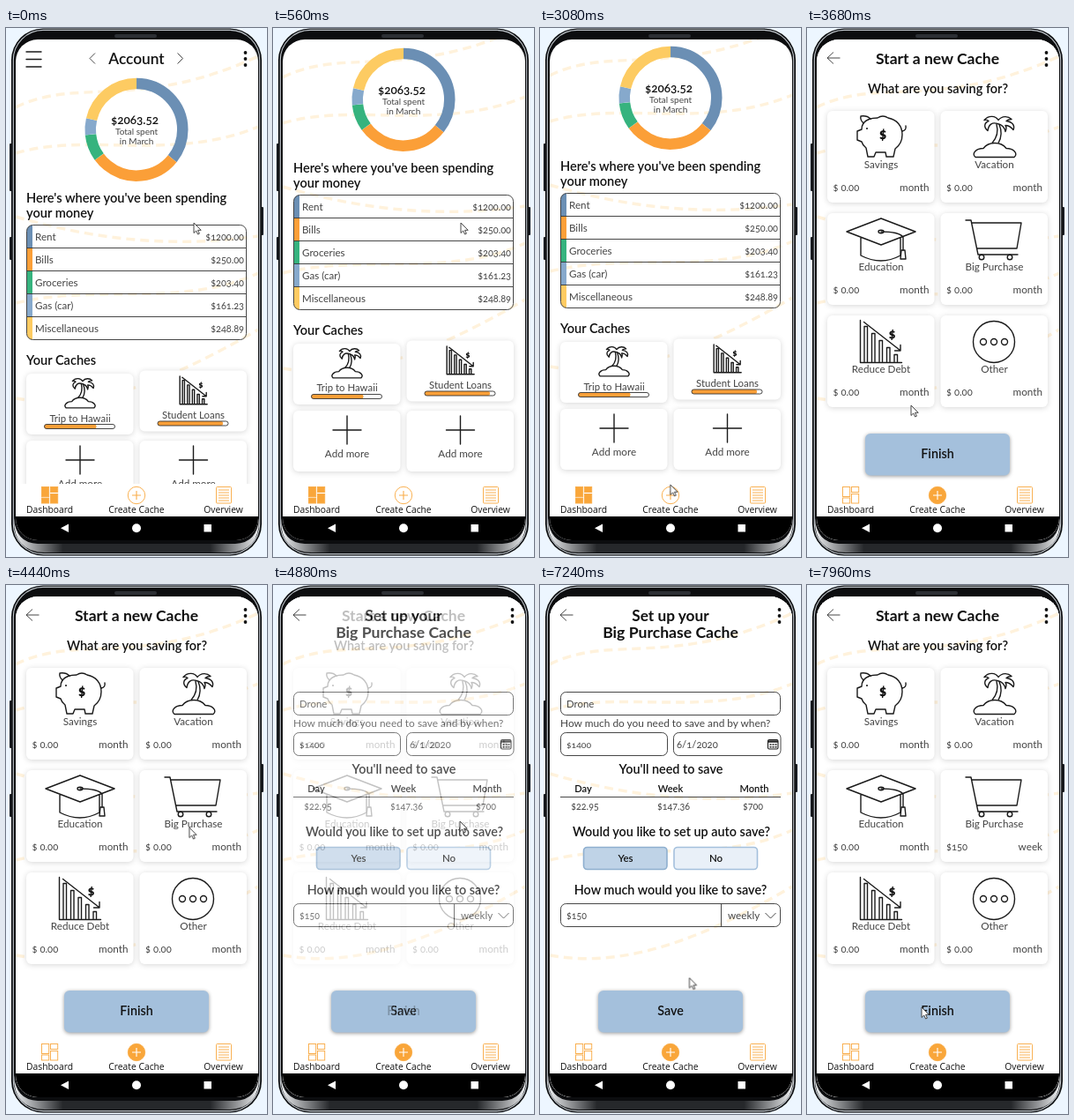
Write an HTML page that moves like this. It is 296 px wide and 600 px high and loops after 8000 ms.

```html
<!DOCTYPE html>
<html lang="en">
<head>
<meta charset="utf-8">
<title>Savings app walkthrough</title>
<style>
html, body { margin: 0; width: 100%; height: 100%; overflow: hidden; background: #edf6ff; }
svg { display: block; width: 296px; height: 600px; }
text { font-family: Lato, "Open Sans", sans-serif; font-variant-numeric: oldstyle-nums; fill: #444; }
.b { font-weight: 600; fill: #111; }
.title { font-weight: 700; fill: #111; }
.heavy { font-weight: 900; fill: #111; }
.nav text { font-family: "Open Sans", "Noto Sans", sans-serif; fill: #111; }
.ln { fill: none; stroke: #1a1a1a; stroke-width: 1.4; stroke-linecap: round; stroke-linejoin: round; }
.ln path { vector-effect: non-scaling-stroke; }
.thin { fill: none; stroke: #333; stroke-width: .9; }
.card { fill: #fff; filter: drop-shadow(0 1px 3px rgba(0, 0, 0, .16)); }
.cta { fill: #a4c0dc; filter: drop-shadow(0 1px 2px rgba(0, 0, 0, .4)); }
.swoosh { fill: none; stroke: #fff2dc; stroke-width: 3.4; stroke-dasharray: 10 6; }
.or { fill: none; stroke: #f9ad4a; stroke-width: .95; }
.or.on { fill: #f9a63a; }

#scroll, #start, #setup, #done, #cursor { animation: 8s linear infinite; }
#scroll { animation-name: scroll; }
#start { animation-name: toStart; }
#setup { animation-name: toSetup; }
#done { animation-name: toDone; }
#cursor { animation-name: point; }

@keyframes scroll {
  0%, 4.6% { transform: translateY(0); animation-timing-function: ease-out; }
  7% { transform: translateY(-34px); }
  10%, 16.75% { transform: translateY(-35px); }
  18%, 100% { transform: translateY(-36px); }
}
@keyframes toStart {
  0%, 40% { opacity: 0; animation-timing-function: cubic-bezier(0, 0, .3, 1); }
  43.75%, 100% { opacity: 1; }
}
@keyframes toSetup {
  0%, 59.4% { opacity: 0; animation-timing-function: cubic-bezier(0, 0, .3, 1); }
  63.2%, 100% { opacity: 1; }
}
@keyframes toDone {
  0%, 94.2% { opacity: 0; animation-timing-function: cubic-bezier(0, 0, .3, 1); }
  98%, 100% { opacity: 1; }
}
@keyframes point {
  0%, 26.5% { transform: translate(213px, 221px); animation-timing-function: ease-in; }
  36.5% { transform: translate(163px, 458px); animation-timing-function: ease-out; }
  39.25%, 41.5% { transform: translate(146px, 525px); animation-timing-function: ease-in-out; }
  46%, 47% { transform: translate(118px, 428px); animation-timing-function: ease-in-out; }
  57%, 63% { transform: translate(212px, 268px); animation-timing-function: ease-in-out; }
  70%, 71% { transform: translate(62px, 131px); animation-timing-function: ease-in; }
  74.5% { transform: translate(101px, 183px); animation-timing-function: ease-out; }
  79%, 84% { transform: translate(260px, 182px); animation-timing-function: ease-in; }
  88% { transform: translate(256px, 372px); animation-timing-function: ease-out; }
  93%, 100% { transform: translate(130px, 479px); }
}
</style>
</head>
<body>
<svg id="stage" viewBox="0 0 296 600"></svg>
<script>
const txt = (x, y, size, s, cls = "", anchor = "middle") =>
  `<text x="${x}" y="${y}" font-size="${size}" class="${cls}" text-anchor="${anchor}">${s}</text>`;
const left = (x, y, size, s, cls) => txt(x, y, size, s, cls, "start");
const right = (x, y, size, s, cls) => txt(x, y, size, s, cls, "end");
const rect = (x, y, w, h, r, attrs) =>
  `<rect x="${x}" y="${y}" width="${w}" height="${h}" rx="${r}" ${attrs}/>`;
const line = (d, attrs = 'class="ln"') => `<path d="${d}" ${attrs}/>`;
const dot = (x, y, r, attrs) => `<circle cx="${x}" cy="${y}" r="${r}" ${attrs}/>`;
const use = (id, x, y, k = 1) => `<use href="#${id}" transform="translate(${x} ${y}) scale(${k})"/>`;

const paper = rect(8, 0, 282, 600, 0, 'fill="#fff"');
const swooshes = [
  "M11 90C80 55 150 95 286 32",
  "M11 142C90 118 190 152 286 112",
  "M11 214C100 240 190 250 286 236",
  "M11 312C100 290 200 318 286 278",
  "M11 420C100 436 190 398 286 342",
].map(d => line(d, 'class="swoosh"')).join("");
const menuDots = [28, 35, 42].map(y => dot(271.5, y, 1.9, 'fill="#111"')).join("");
const back = line("M37.5 34H23M30 27.5L23 34L30 40.5", 'class="thin"');

const defs = `<defs>
  <clipPath id="screen">${rect(11, 13, 275, 568, 25, "")}</clipPath>
  <linearGradient id="gloss">
    <stop offset="0" stop-color="#eef0f2"/><stop offset=".2" stop-color="#26282b"/>
    <stop offset=".8" stop-color="#26282b"/><stop offset="1" stop-color="#eef0f2"/>
  </linearGradient>
  <g id="palm" class="ln">
    <path d="M3 47C-2 43 4 37 12 37C18 29 32 29 38 37C46 37 52 43 47 47Z"/>
    <path d="M22 31C28 24 29 17 27 10M29 31C33 24 33 17 30 10"/>
    <path d="M28 9C22 7 18 10 17 17C12 13 13 8 18 6Q16 4 13 5C18-1 26 0 29 5C33 0 40 0 44 4Q40 4 38 6C45 7 48 11 46 16Q42 11 37 11Q39 14 37 18C36 13 33 10 28 9Z"/>
  </g>
  <g id="chart" class="ln">
    <path d="M1 0V48H48"/>
    ${[7, 15, 23, 31, 39].map((y, i) => `<path d="M${5.5 + i * 8.5} 47V${y}h3.5V47"/>`).join("")}
    <path d="M5 2L46 34M46.5 28V34.5H40"/>
    ${txt(37, 20, 15, "$", "heavy").replace("<text", '<text stroke="none"')}
  </g>
</defs>`;

// Bottom navigation: the active entry is drawn filled
function nav(home) {
  const tile = (x, y, h) => rect(x, y, 8.2, h, 0, `class="or ${home ? "on" : ""}"`);
  const sheet = [524, 527, 530, 533, 536].map(y => `M241 ${y}h12`).join("");
  return `<g class="nav">${rect(8, 517, 282, 38, 0, 'fill="#fff"')}
    ${tile(40.5, 520.5, 11) + tile(40.5, 533, 6) + tile(50.5, 520.5, 6) + tile(50.5, 528.5, 10.5)}
    ${dot(148, 530, 9.7, `class="or ${home ? "" : "on"}"`)}
    ${line("M148 525v10M143 530h10", `stroke="${home ? "#f9ad4a" : "#fff"}" stroke-width="1.1"`)}
    ${rect(238.5, 520.5, 17, 18.5, 1, 'class="or"') + line(sheet, 'class="or"')}
    ${txt(49.5, 550, 10.3, "Dashboard") + txt(148, 550, 10.3, "Create Cache") + txt(246.5, 550, 10.3, "Overview")}
  </g>`;
}

function donut() {
  const parts = [[0, 129, "#6b8fb4"], [129, 105, "#fb9f38"], [234, 30, "#36b37e"], [264, 19, "#86a9cc"], [283, 77, "#fdcb62"]];
  return parts.map(([from, len, color]) =>
    dot(148, 115.3, 52.3, `pathLength="360" fill="none" stroke="${color}" stroke-width="12.5"
      stroke-dasharray="${len} ${360 - len}" transform="rotate(${from - 90} 148 115.3)"`)).join("");
}

function spending() {
  const rows = [
    ["Rent", "$1200.00", "#6b8fb4"],
    ["Bills", "$250.00", "#fb9f38"],
    ["Groceries", "$203.40", "#36b37e"],
    ["Gas (car)", "$161.23", "#86a9cc"],
    ["Miscellaneous", "$248.89", "#fdcb62"],
  ];
  const body = rows.map(([name, sum, color], i) => {
    const y = 223.5 + i * 26;
    return rect(23.5, y, 6.5, 26, 0, `fill="${color}"`) + left(33, y + 17.5, 11.6, name) +
      right(270, y + 17.5, 10.9, sum) + (i ? line(`M23.5 ${y}H272.5`, 'class="thin"') : "");
  }).join("");
  return `<clipPath id="table">${rect(23.5, 223.5, 249, 130, 7, "")}</clipPath>
    <g clip-path="url(#table)">${body}</g>` + rect(23.5, 223.5, 249, 130, 7, 'class="thin"');
}

function cache(x, y, name, fill) {
  return rect(x, y, 121.5, 69, 6, 'class="card"') + txt(x + 61, y + 54.5, 11.4, name) +
    rect(x + 20.5, y + 57.5, fill, 5, 2, 'fill="#fb9f38"') +
    rect(x + 20.5, y + 57.5, 80, 5, 2.5, 'class="thin"');
}

function addCard(x) {
  const c = x + 61;
  return rect(x, 468, 121.5, 69, 6, 'class="card"') +
    line(`M${c} 474v32M${c - 16} 490h32`) + txt(c, 521.3, 11.7, "Add more");
}

function dashboard() {
  return `${paper}<g id="scroll">${swooshes}
    ${line("M23 27H40M23 35.5H40M23 44H40")}
    ${line("M101 28.5L95 34.5L101 40.5M194.5 28.5L200.5 34.5L194.5 40.5", 'class="thin"')}
    ${txt(148, 41, 17.3, "Account", "b") + menuDots + donut()}
    ${txt(146, 109, 13.5, "$2063.52", "b") + txt(148, 121, 10, "Total spent") + txt(148, 132, 10, "in March")}
    ${left(23, 198, 14.6, "Here's where you've been spending", "b") + left(23, 215, 14.6, "your money", "b")}
    ${spending() + left(23, 382, 14.6, "Your Caches", "b")}
    ${cache(23, 392, "Trip to Hawaii", 59) + use("palm", 66, 397, .72)}
    ${cache(151.5, 388.5, "Student Loans", 74) + use("chart", 196.5, 395, .66)}
    ${addCard(23) + addCard(151.5)}
  </g>${nav(true)}`;
}

const icons = {
  pig: line("M64 108C67 104 73 102 80 102Q86 98 92 102C102 104 108 111 108 121C108 129 104 134 100 137L98 146H90L89 141H78L76 146H69L67 136Q63 133 62 129L57 127V117L62 115Q62 111 64 108Z") +
    line("M64 108Q60 104 61 100Q68 99 72 103M108 117Q113 116 112 111") +
    dot(68, 114, 1.1, 'fill="#222"') + txt(86, 126, 16, "$", "heavy"),
  cap: line("M45 231L84 216L123 231L84 246ZM61 238V258Q84 270 106 258V238M84 231Q104 231 109 237V252") +
    line("M107 252H111L112 262H106Z") + `<ellipse cx="84" cy="231" rx="3" ry="1.7" class="ln"/>`,
  cart: line("M180 218H186L194 257H239M187 221H243L238 250H193") +
    dot(198, 260, 2.8, 'class="ln"') + dot(230, 260, 2.8, 'class="ln"'),
  other: [[212, 23.5], [200, 3.5], [212, 3.5], [224, 3.5]].map(([x, r]) => dot(x, 356, r, 'class="ln"')).join(""),
};

function goals(amount, period) {
  const names = ["Savings", "Vacation", "Education", "Big Purchase", "Reduce Debt", "Other"];
  const cards = names.map((name, i) => {
    const x = i % 2 ? 151.5 : 23, y = 94 + (i >> 1) * 116, big = i === 3;
    return rect(x, y, 121.5, 104, 6, 'class="card"') + txt(x + 61, y + 65, 11.7, name) +
      left(x + 6.5, y + 90.5, 11.2, big ? amount : "$ 0.00") +
      right(x + 115.5, y + 90.5, 11.7, big ? period : "month");
  }).join("");
  return paper + swooshes + back + menuDots +
    txt(148, 41, 17.5, "Start a new Cache", "title") + txt(148.5, 74, 14.5, "What are you saving for?", "b") +
    cards + Object.values(icons).join("") + use("palm", 188, 99.5) + use("chart", 59.5, 331.5) +
    button("Finish") + nav(false);
}

const button = label => rect(66, 460, 164, 47.5, 6, 'class="cta"') + txt(148, 488, 14.3, label, "b");
const field = (x, y, w) => rect(x + .5, y + .5, w, 26, 6, 'class="thin"');

function setup() {
  const columns = [["Day", 49, "$22.95", 51], ["Week", 148, "$147.36", 151.5], ["Month", 243, "$700", 241.5]]
    .map(([head, hx, sum, sx]) => txt(hx, 235, 11.1, head, "b") + txt(sx, 255, 10.7, sum)).join("");
  const calendar = rect(258.5, 175.5, 11.5, 10.5, 1.5, 'class="ln" style="stroke-width:1.1"') +
    line("M258.5 177.5H270", 'stroke="#222" stroke-width="2.4"') +
    line("M260.5 181H268.5M260.5 183.7H268.5", 'stroke="#222" stroke-width="1.6" stroke-dasharray="2 1"');
  const choice = (x, label, fill, edge) =>
    rect(x, 297.5, 94.5, 25, 4, `fill="${fill}" stroke="${edge}" stroke-width="1.6"`) + txt(x + 47.5, 314, 11.5, label, "b");
  return paper + swooshes + back + menuDots +
    txt(148, 41, 17.3, "Set up your", "title") + txt(148, 60, 17.6, "Big Purchase Cache", "title") +
    field(23, 121, 249) + left(30, 138.5, 11.4, "Drone") +
    left(23, 161, 11.9, "How much do you need to save and by when?") +
    field(23, 167, 121) + left(30, 184.5, 10.4, "$1400") +
    field(151, 167, 121.5) + left(155, 184.5, 11.3, "6/1/2020") + calendar +
    txt(148.5, 214, 14.4, "You'll need to save", "b") + columns + line("M23 240.5H273", 'class="thin"') +
    txt(149, 285, 14.4, "Would you like to set up auto save?", "b") +
    choice(49.5, "Yes", "#bfd3e7", "#8eafcf") + choice(152, "No", "#e9f0f8", "#a4c0dc") +
    txt(148, 351, 14.4, "How much would you like to save?", "b") +
    field(23, 361, 249) + line("M205.5 361.5V387.5", 'class="thin"') +
    left(30, 378.5, 10.6, "$150") + left(213, 378.5, 11.7, "weekly") +
    line("M255.5 372L261.5 378L267.5 372", 'class="thin"') + button("Save") + nav(false);
}

const keys = (x, list) => list.map(([y, h]) => rect(x, y, 3, h, 1, 'fill="#1a1d22"')).join("");
const shell = keys(4, [[131, 54], [237, 26]]) + keys(289, [[203, 32]]) +
  rect(6, .5, 284, 598, 36, 'fill="#0c0d0f"') +
  rect(8.3, 2.4, 279.4, 594.2, 34, 'fill="none" stroke="#c3c9cf" stroke-width="1.1"') +
  line("M9 556Q11 584 36 585H260Q285 584 287 556Q288 594 252 595H44Q8 594 9 556Z", 'fill="url(#gloss)"') +
  rect(123, 7, 48, 4, 2, 'fill="#2c2f34"');
const softKeys = rect(8, 554, 282, 30, 0, 'fill="#000"') +
  line("M71 562.5V572L62 567.2Z", 'fill="#fff"') + dot(148, 567.2, 5, 'fill="#fff"') +
  rect(224.5, 563, 8.5, 8.5, 0, 'fill="#fff"');
const cursor = line("M0 0V11.5L2.7 9L4.6 13L6.4 12.2L4.6 8.3H8.2Z", 'fill="#fff" stroke="#333" stroke-width=".9"');

document.getElementById("stage").innerHTML = `${defs}${shell}
  <g clip-path="url(#screen)">
    <g>${dashboard()}</g>
    <g id="start">${goals("$ 0.00", "month")}</g>
    <g id="setup">${setup()}</g>
    <g id="done">${goals("$150", "week")}</g>
    ${softKeys}
  </g>
  <g id="cursor">${cursor}</g>`;
</script>
</body>
</html>
```
